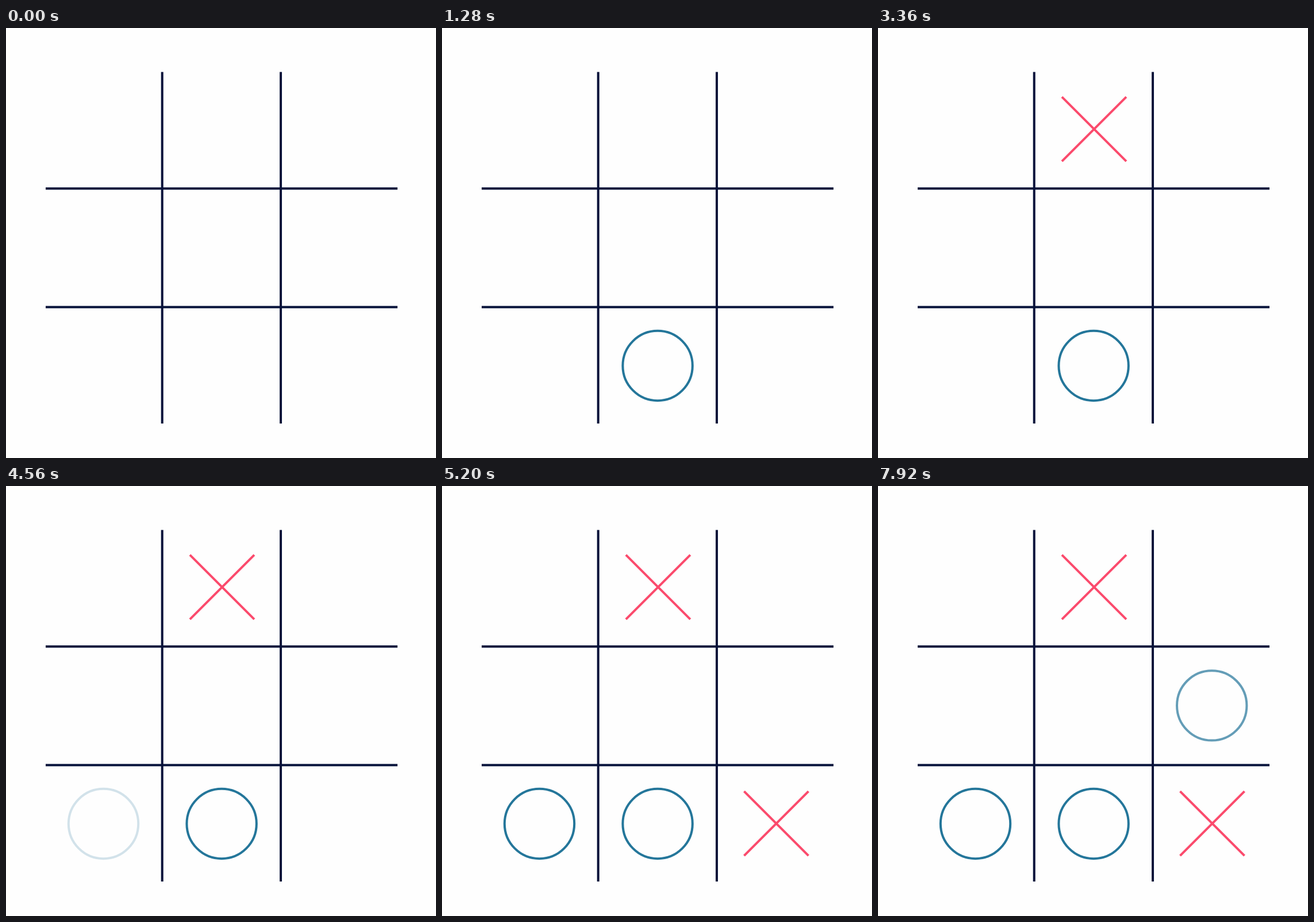
An HTML page for the animation above (8000 ms loop, 748 px wide and 748 px high).

```html
<!DOCTYPE html>
<html lang="en">
<head>
<meta charset="utf-8">
<title>Noughts and crosses</title>
<style>
  html, body { margin: 0; width: 100%; height: 100%; overflow: hidden; background: #fefefe; }
  svg { display: block; width: 100%; height: 100%; fill: none; stroke-width: 4; }
  .grid { stroke: #07123a; }
  .nought { stroke: #24769a; }
  .cross { stroke: #fb4a6c; }
</style>
</head>
<body>
<svg viewBox="0 0 748 748">
  <path class="grid" d="M271.7 76.5V688M478 76.5V688M69 279.3H681M69 485.4H681"/>
  <g id="marks"></g>
</svg>
<script>
const LOOP = 8000, TICK = 80, FADE = 320;
const CELL = 205.6, FIRST = 169.5;

const shapes = {
  nought: '<circle r="60.7"/>',
  cross: '<path d="M-56 -56L56 56M56 -56L-56 56"/>'
};

const moves = [
  { type: 'nought', col: 1, row: 2, start: 880 },
  { type: 'cross', col: 1, row: 0, start: 1290 },
  { type: 'nought', col: 0, row: 2, start: 4496 },
  { type: 'cross', col: 2, row: 2, start: 4880 },
  { type: 'nought', col: 2, row: 1, start: 7696 }
];

const marks = document.getElementById('marks');
for (const move of moves) {
  const nudge = move.type === 'cross' ? 0.8 : 0;
  const x = FIRST + move.col * CELL + nudge;
  const y = FIRST + 6.8 + move.row * CELL - nudge / 2;
  move.node = document.createElementNS('http://www.w3.org/2000/svg', 'g');
  move.node.setAttribute('class', move.type);
  move.node.setAttribute('transform', `translate(${x} ${y})`);
  move.node.innerHTML = shapes[move.type];
  marks.append(move.node);
}

function draw(now) {
  const time = Math.floor((now % LOOP) / TICK) * TICK;
  for (const { node, start } of moves) {
    node.style.opacity = Math.min(1, Math.max(0, (time - start) / FADE));
  }
  requestAnimationFrame(draw);
}
draw(performance.now());
</script>
</body>
</html>
```
